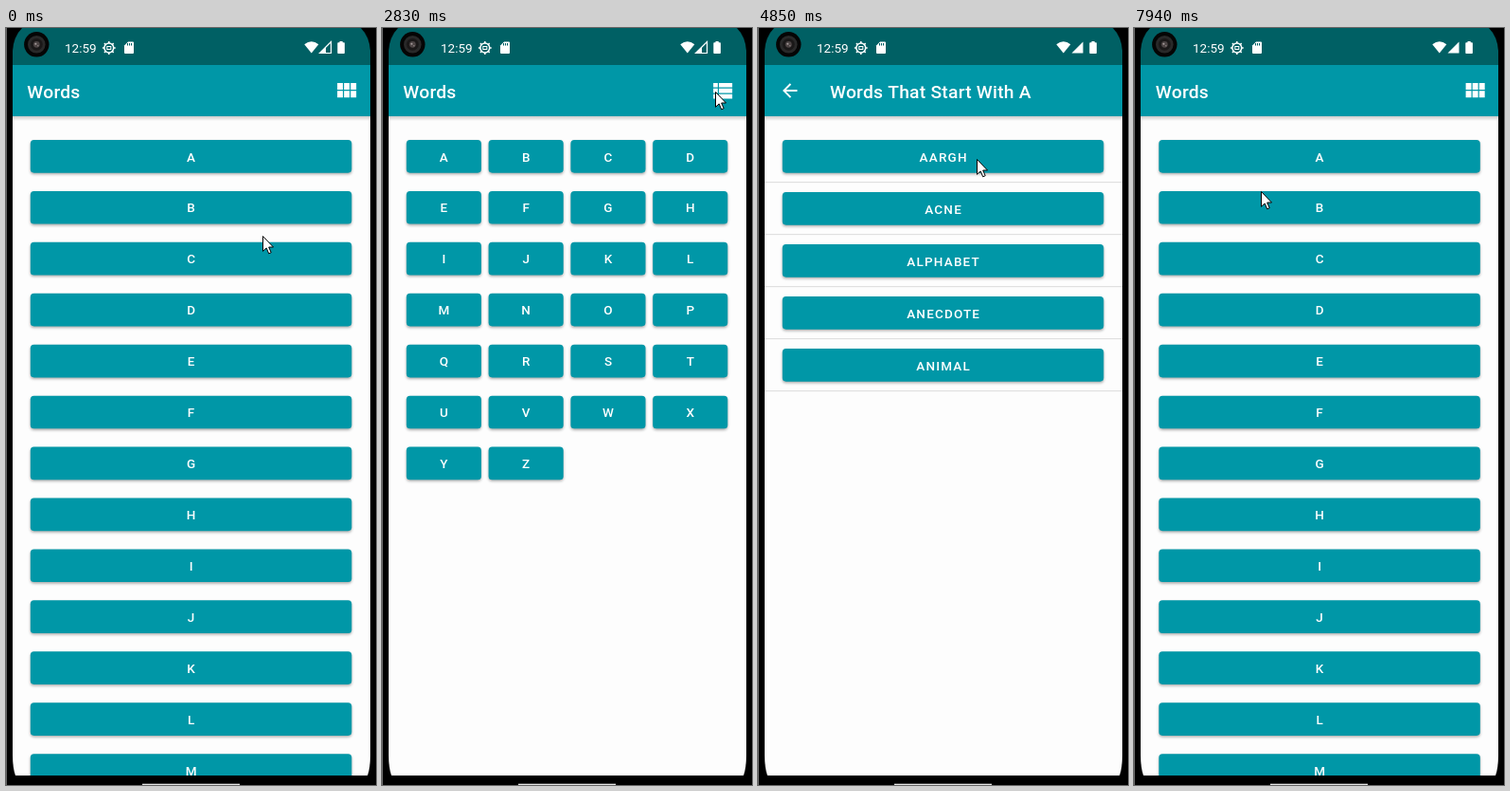
Animation of 391 by 798 pixels, one loop 8000 ms. Source, as an HTML page with a canvas:

```html
<!DOCTYPE html>
<html lang="en">
<head>
<meta charset="utf-8">
<title>Words</title>
<style>
  html, body { margin: 0; width: 100%; height: 100%; overflow: hidden; background: #000; }
  canvas { display: block; }
</style>
</head>
<body>
<canvas id="stage" width="391" height="798"></canvas>
<script>
const ctx = document.getElementById('stage').getContext('2d');
const LOOP = 8000, DP = 0.963, TEAL = '#0097a7', DARK = '#006064';
const LETTERS = [...'ABCDEFGHIJKLMNOPQRSTUVWXYZ'];
const WORDS = ['AARGH', 'ACNE', 'ALPHABET', 'ANECDOTE', 'ANIMAL'];

const STEPS = [
  [0, 0, 1], [120, 1080, 8], [1200, 1200, 1], [2140, 2290, 2], [2560, 2830, 3],
  [3140, 3560, 4], [3680, 3800, 2], [4070, 4850, 7], [4970, 5090, 2],
  [5210, 5900, 6], [6035, 6170, 2], [6320, 7130, 7], [7400, 7640, 3], [7790, 7940, 2]
].flatMap(([a, b, n]) => Array.from({ length: n }, (_, i) => a + (n > 1 ? (b - a) * i / (n - 1) : 0)));

// Pointer tip: [time, x, y]
const POINTER = [
  [0, 271, 219], [1080, 344, 73], [1200, 352, 67], [3290, 352, 67], [3560, 211, 127],
  [4460, 211, 127], [4850, 231, 138], [5090, 236, 139], [5900, 224, 389],
  [6035, 190, 396], [6170, 156, 368], [7130, 36, 58], [7640, 36, 58.5], [7940, 134, 172]
];

const ICONS = {
  module: new Path2D('M4 11h5V5H4zm0 7h5v-6H4zm6 0h5v-6h-5zm6 0h5v-6h-5zM10 11h5V5h-5zm6-6v6h5V5z'),
  list: new Path2D('M4 14h4v-4H4zm0 5h4v-4H4zM4 9h4V5H4zm5 5h12v-4H9zm0 5h12v-4H9zM9 5v4h12V5z'),
  back: new Path2D('M20 11H7.83l5.59-5.59L12 4l-8 8 8 8 1.41-1.41L7.83 13H20z')
};
const SCREEN = new Path2D('M17 0Q8 9 7 24V766Q7 780 10 788H382Q385 780 385 766V24Q384 9 375 0Z');
const ARROW = new Path2D('M.5 .5V16.3L4.2 12.9L6.7 18.8L9.2 17.7L6.7 12H11.5Z');
const SD_CARD = new Path2D('M129 14.5H134Q135 14.5 135 15.5V26Q135 27 134 27H126Q125 27 125 26V18.5Z');
const WIFI = new Path2D('M315.3 17.2Q322.8 11.2 330.3 17.2L322.8 26.5Z');
const SIGNAL = new Path2D('M343.5 14.5V26.5H331.5Z');

const clamp = v => Math.max(0, Math.min(1, v));
const mix = (a, b, p) => a + (b - a) * p;

function pointerAt(t) {
  const i = POINTER.findIndex(k => k[0] > t);
  if (i < 0) return POINTER.at(-1).slice(1);
  const [t0, x0, y0] = POINTER[i - 1], [t1, x1, y1] = POINTER[i];
  const p = (t - t0) / (t1 - t0), e = p * p * (3 - 2 * p);
  return [mix(x0, x1, e), mix(y0, y1, e)];
}

// Two joined Béziers: a quick start and a very long settle.
function slideEase(x) {
  const first = x < 1 / 6;
  const [xs, ys] = first
    ? [[0, .05, .1333, 1 / 6], [0, 0, .06, .4]]
    : [[1 / 6, .2083, .25, 1], [.4, .82, 1, 1]];
  const bez = ([a, b, c, d], s) => {
    const r = 1 - s;
    return a * r * r * r + 3 * b * r * r * s + 3 * c * r * s * s + d * s * s * s;
  };
  let lo = 0, hi = 1;
  for (let i = 0; i < 20; i++) {
    const m = (lo + hi) / 2;
    if (bez(xs, m) < x) lo = m; else hi = m;
  }
  return bez(ys, lo);
}

function rect(x, y, w, h, color) {
  ctx.fillStyle = color;
  ctx.fillRect(x, y, w, h);
}

function disc(x, y, r, color) {
  ctx.fillStyle = color;
  ctx.beginPath();
  ctx.arc(x, y, r, 0, 7);
  ctx.fill();
}

function text(str, x, y, size, { weight = 500, spacing = 0, align = 'left' } = {}) {
  ctx.font = `${weight} ${size}px Roboto, sans-serif`;
  ctx.letterSpacing = spacing * size + 'px';
  ctx.textAlign = align;
  ctx.fillStyle = '#fff';
  ctx.fillText(str, x, y);
}

function icon(path, x, y, scale) {
  ctx.save();
  ctx.translate(x, y);
  ctx.scale(scale, scale);
  ctx.fillStyle = '#fff';
  ctx.fill(path);
  ctx.restore();
}

function button(label, x, y, w, press) {
  const h = 36 * DP;
  ctx.save();
  ctx.beginPath();
  ctx.roundRect(x, y, w, h, 4 * DP);
  ctx.shadowColor = 'rgba(0,0,0,.32)';
  ctx.shadowBlur = 3;
  ctx.shadowOffsetY = 1.6;
  ctx.fillStyle = TEAL;
  ctx.fill();
  if (press > 0) {
    ctx.shadowColor = 'transparent';
    ctx.clip();
    disc(mix(211, x + w / 2, press), y + h / 2, mix(30, w * .6, press), 'rgba(255,255,255,.2)');
  }
  ctx.restore();
  text(label, x + w / 2 + .6, y + 22.5, 14 * DP, { spacing: .0893, align: 'center' });
}

function toolbar(title, x) {
  const shade = ctx.createLinearGradient(0, 93, 0, 98);
  shade.addColorStop(0, 'rgba(0,0,0,.2)');
  shade.addColorStop(1, 'rgba(0,0,0,0)');
  rect(-60, 93, 520, 5, shade);
  rect(-60, 39, 520, 54, TEAL);
  text(title, x, 74, 20 * DP, { spacing: .0125 });
}

// A touch glow on a toolbar icon: soft spot, then a flat disc, then a fade.
function ripple(t, start, x) {
  const age = t - start;
  if (age < 0 || age > 700) return;
  const p = clamp(age / 150), fade = 1 - clamp((age - 440) / 260);
  const glow = ctx.createRadialGradient(x, 66, 0, x, 66, 19.4);
  glow.addColorStop(0, `rgba(255,255,255,${mix(.4, .2, p) * fade})`);
  glow.addColorStop(.6, `rgba(255,255,255,${mix(.22, .2, p) * fade})`);
  glow.addColorStop(1, `rgba(255,255,255,${mix(.02, .2, p) * fade})`);
  disc(x, 66, 19.4, glow);
}

function lettersWindow(t) {
  const grid = t >= 2140 && t < 3140, columns = grid ? 4 : 1;
  const cell = 347.2 / columns;
  rect(-60, 39, 520, 760, '#fdfdfd');
  LETTERS.forEach((letter, i) => {
    const y = 118 + Math.floor(i / columns) * 56 * DP;
    if (y > 790) return;
    const press = i === 0 && t >= 4070 && t < 5000 ? clamp((t - 4030) / 300) : 0;
    button(letter, 25.8 + (i % columns) * cell, y, cell - 8 * DP, press);
  });
  toolbar('Words', 22.3);
  ripple(t, 2080, 359.5);
  ripple(t, 3080, 359.5);
  icon(grid ? ICONS.list : ICONS.module, 345.4, 52, 1.18);
}

function wordsWindow(t) {
  rect(-60, 39, 520, 760, '#fdfdfd');
  WORDS.forEach((word, i) => {
    const y = 118 + i * 55;
    button(word, 25.8, y, 339.5, 0);
    rect(-60, y + 44, 520, 1.2, '#e0e0e0');
  });
  toolbar('Words That Start With A', 76);
  ripple(t, 7340, 33.3);
  icon(ICONS.back, 22.2, 54.5, DP);
}

function slide(t, start, from, to) {
  const p = slideEase(clamp((t - start) / 450)), entered = t - start > 90;
  ctx.save();
  ctx.translate(38 * (entered ? 1 - p : -p), 0);
  (entered ? to : from)(t);
  ctx.restore();
}

function statusBar(t) {
  rect(0, 0, 391, 39, DARK);
  text('12:59', 62, 26, 14 * DP, { weight: 400 });
  ctx.strokeStyle = '#fff';
  ctx.lineWidth = 1.5;
  ctx.beginPath();
  ctx.arc(108.8, 21, 4.9, 0, 7);
  ctx.stroke();
  for (let i = 0; i < 8; i++) {
    const a = i * Math.PI / 4, c = Math.cos(a), s = Math.sin(a);
    ctx.beginPath();
    ctx.moveTo(108.8 + 5 * c, 21 + 5 * s);
    ctx.lineTo(108.8 + 6.9 * c, 21 + 6.9 * s);
    ctx.stroke();
  }
  ctx.lineWidth = 1;
  ctx.strokeRect(106.8, 19.5, 4, 3);
  ctx.fillStyle = '#fff';
  ctx.fill(SD_CARD);
  for (let i = 0; i < 3; i++) rect(128 + i * 2, 16, 1, 2.5, DARK);
  ctx.fillStyle = '#fff';
  ctx.fill(WIFI);
  if (t < 3140) {
    ctx.lineWidth = 1.2;
    ctx.stroke(SIGNAL);
    ctx.beginPath();
    ctx.moveTo(338, 20);
    ctx.lineTo(338, 26.5);
    ctx.lineTo(331.5, 26.5);
    ctx.fill();
  } else ctx.fill(SIGNAL);
  rect(352.5, 14, 3.2, 2, '#fff');
  ctx.beginPath();
  ctx.roundRect(350.3, 15.2, 7.6, 11.8, .8);
  ctx.fill();
}

function camera() {
  disc(32.3, 17.3, 13.2, '#050505');
  disc(32.3, 17.3, 9.3, '#292929');
  disc(32.3, 17.3, 6.4, '#1a1818');
  disc(32.3, 17.3, 3.4, '#4c4444');
  disc(31.4, 16.8, 1, '#aaa0a0');
  disc(33.8, 18.7, .8, '#8a8080');
}

function draw(t) {
  rect(0, 0, 391, 798, '#000');
  rect(0, 0, 1, 798, '#666');
  ctx.save();
  ctx.clip(SCREEN);
  if (t < 6000) slide(t, 4300, lettersWindow, wordsWindow);
  else slide(t, 7625, wordsWindow, lettersWindow);
  statusBar(t);
  ctx.restore();
  camera();
  rect(144, 796.7, 103, 1.3, '#e4e4e4');

  ctx.save();
  ctx.translate(...pointerAt(t));
  ctx.fillStyle = '#fff';
  ctx.strokeStyle = '#000';
  ctx.lineWidth = 1;
  ctx.fill(ARROW);
  ctx.stroke(ARROW);
  ctx.restore();
}

function tick() {
  const t = performance.now() % LOOP;
  draw(STEPS.findLast(s => s <= t));
  requestAnimationFrame(tick);
}
tick();
</script>
</body>
</html>
```
